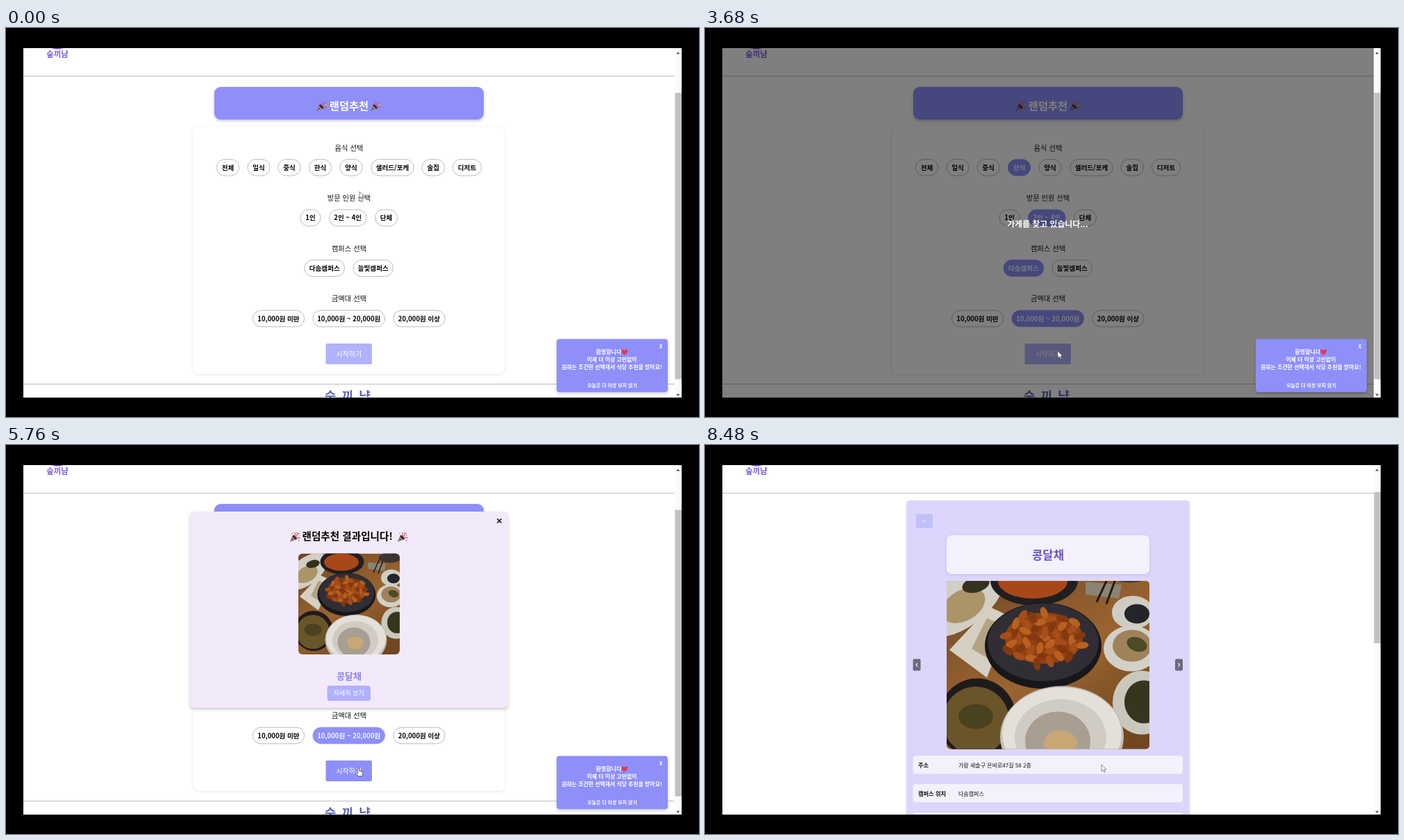
Write an HTML page that moves like this. It is 998x561 px and loops after 8560 ms.

```html
<!DOCTYPE html>
<html lang="ko">
<head>
<meta charset="utf-8">
<style>
html, body { margin: 0; height: 100%; overflow: hidden; background: #000; }
svg { display: block; width: 100%; height: 100%; }
text { font-family: "Noto Sans CJK KR", "Noto Sans KR", "Noto Sans CJK JP", sans-serif; white-space: pre; }
.soft { filter: drop-shadow(0 1px 2px rgba(0,0,0,.1)); }
.lift { filter: drop-shadow(0 2px 2px rgba(0,0,0,.22)); }
.chip rect { fill: #fff; stroke: #a9a8b4; stroke-width: .8; }
.chip text { fill: #000; }
.chip.on rect { fill: #8e8ff9; stroke: #8e8ff9; }
.chip.on text { fill: #f4f4ff; }
</style>
</head>
<body>
<svg id="stage" viewBox="0 0 998 561"></svg>
<script>
const LOOP = 8560, STEP = 80, SCROLL = 65;
const SEARCH = 3680, FOUND = 5680, DETAIL = 7200;
const MAIN = '#8e8ff9', PALE = '#b1b1fc';
const BRAND = '숲끼냠', SHOP = '콩달채', CAMPUS = ['다솜캠퍼스', '늘빛캠퍼스'];

const rect = (x, y, w, h, r, fill, more = '') =>
  `<rect x="${x}" y="${y}" width="${w}" height="${h}" rx="${r}" fill="${fill}" ${more}/>`;
// y is the middle of the line
const text = (x, y, s, size, weight, fill, anchor = 'middle', more = '') =>
  `<text x="${x}" y="${y + size * .37}" font-size="${size}" font-weight="${weight}" fill="${fill}" text-anchor="${anchor}" ${more}>${s}</text>`;
const oval = (x, y, rx, ry, fill, turn = 0) =>
  `<ellipse rx="${rx}" ry="${ry}" fill="${fill}" transform="translate(${x} ${y}) rotate(${turn})"/>`;
const path = (d, fill, more = '') => `<path d="${d}" fill="${fill}" ${more}/>`;
const group = (id, body, more = '') => `<g id="${id}" ${more}>${body}</g>`;

const popper = (x, y) => `<g transform="translate(${x} ${y})">` +
  path('M0 14.5L4 5.5L9.5 11Z', '#4a4a86') + path('M1.4 11.4L3.8 13M2.8 8.2L6.8 12', 'none', 'stroke="#f0b548" stroke-width="1.2"') +
  oval(6.8, 8.2, 1.8, 3.8, '#2d2c54', -45) +
  path('M6.5 6.5Q8.5 4 6.5 1M8.5 8Q10 3 13 2.5M9.5 9.5Q12 7.5 14.5 9.5', 'none', 'stroke="#e0604a" stroke-width="1.3"') +
  oval(10, 1.5, .9, .9, '#58a6e8') + oval(13.5, 5.8, .9, .9, '#f0b548') +
  oval(3.2, 2.6, .9, .9, '#58a6e8') + oval(12.5, 12.5, .9, .9, '#6b8fe0') + '</g>';

// Table of dishes in a 292 x 291 square
function dishes() {
  let s = rect(0, 0, 292, 291, 0, 'url(#wood)');
  s += oval(22, 52, 72, 38, '#d2cec4', -38) + oval(24, 60, 34, 22, '#ab9468', -30) + oval(42, 30, 20, 11, '#34311f', -15);
  s += path('M62 62L92 76L58 164L4 124Z', '#d5d0c3') + path('M58 78L84 90L62 138L36 122Z', '#b3a384');
  s += oval(126, 24, 63, 36, '#211e22') + oval(124, 25, 50, 25, '#a84818');
  s += path('M200 26L252 30L248 50L200 44Z', '#898473') + path('M216 55L236 12M230 58L246 14', 'none', 'stroke="#211a17" stroke-width="3"');
  s += oval(264, 12, 32, 15, '#3b3432');
  s += oval(268, 70, 30, 24, '#cfccc3') + oval(274, 72, 18, 14, '#24242b');
  s += oval(266, 122, 40, 33, '#d2d0c7') + oval(267, 118, 28, 23, '#a0825a') + oval(274, 116, 15, 10, '#4d4a26', 20);
  s += oval(281, 200, 42, 46, '#cac8be') + oval(284, 199, 28, 31, '#36361f');
  s += oval(139, 118, 84, 62, '#17161a') + oval(139, 113, 80, 56, '#302e34');
  s += oval(140, 107, 56, 37, '#914114');
  for (let i = 0; i < 44; i++) {
    const a = i * 2.4, r = Math.sqrt(i / 44);
    s += oval(140 + 59 * r * Math.cos(a), 107 + 40 * r * Math.sin(a), 9, 5, ['#b9601f', '#83380f', '#a64d18'][i % 3], i * 47);
  }
  s += oval(44, 223, 56, 58, '#1e1b1d') + oval(42, 226, 48, 49, '#6a5429') + oval(42, 220, 25, 18, '#4a421e');
  s += oval(166, 249, 89, 73, '#c3bdb4') + oval(166, 245, 86, 67, '#e4e0d9') + oval(164, 250, 66, 55, '#d0cbc3');
  s += oval(160, 256, 47, 43, '#a89e91') + oval(164, 258, 24, 18, '#c9a775');
  return s;
}

const rows = [
  ['음식 선택', ['전체', 303, 33], ['일식', 347.5, 33], ['중식', 391.5, 33], ['한식', 436, 33, 1040], ['양식', 480.5, 33],
    ['샐러드/포케', 525.5, 62], ['술집', 598.5, 33.5], ['디저트', 643, 42]],
  ['방문 인원 선택', ['1인', 423.5, 30], ['2인 ~ 4인', 465, 54.5, 1680], ['단체', 531, 33]],
  ['캠퍼스 선택', [CAMPUS[0], 429.5, 58.5, 2320], [CAMPUS[1], 499.5, 58.5]],
  ['금액대 선택', ['10,000원 미만', 355, 75], ['10,000원 ~ 20,000원', 441.5, 104.5, 2880], ['20,000원 이상', 557.5, 75]]
];
const hits = [[460.5, 455, 66.5, 30]];

function chips() {
  return rows.map(([title, ...list], i) => {
    const y = 201.2 + 72.6 * i;
    return text(494, y - 28.5, title, 10.3, 500, '#111') + list.map(([label, x, w, on = LOOP]) => {
      hits.push([x, y - 12, w, 24]);
      return `<g class="chip" data-on="${on}">${rect(x + .4, y - 11.8, w - .8, 23.6, 11.8, '#fff')}${text(x + w / 2, y, label, 9.55, 700, '')}</g>`;
    }).join('');
  }).join('');
}

const header = rect(25, 29, 938, 105, 0, '#fff') + rect(25, 134, 938, 1, 0, '#bdbdc2') +
  oval(74, 76, 19.8, 19.8, '#8257e6') + text(74, 103, BRAND, 11.5, 900, '#7d5bdc') +
  text(697, 42, '더 많은 기능을 이용하려면 로그인이 필요합니다.', 9.45, 500, '#8379d3', 'start') +
  text(889, 42, '로그인/회원가입', 9.4, 500, '#6a50c0', 'start', 'text-decoration="underline"') +
  [['소개', 611], ['고객센터', 660], ['커뮤니티', 732], ['최신리뷰', 805], ['비교함', 878], ['My', 938]]
    .map(([s, x]) => text(x, 83, s, 13.2, 700, '#8a80da', 'start')).join('');

const home = rect(300, 85, 388, 47, 9, MAIN, 'class="lift"') + popper(447.5, 105) + popper(525, 105) +
  text(494, 112, '랜덤추천', 15.3, 700, '#fff') +
  rect(269, 142, 449.5, 357, 9, '#fff', 'class="soft"') + chips() +
  rect(460.5, 455, 66.5, 30, 2, PALE, 'id="start"') + text(493.8, 470, '시작하기', 10.1, 400, '#fff') +
  rect(25, 513, 938, 1, 0, '#bdbdc2') +
  [...BRAND].map((c, i) => text(467 + 24.8 * i, 531.5, c, 18, 900, '#5f62bd')).join('');

const dim = rect(25, 29, 938, 504, 0, '#000', 'opacity=".5"') +
  text(493.5, 283, '가게를 찾고 있습니다...', 11.9, 700, '#fff');

const modal = rect(265, 96, 458, 283, 6, '#f2e9fa', 'class="lift"') +
  path('M707.4 106.4l6 6m0-6l-6 6', 'none', 'stroke="#222" stroke-width="1.7"') +
  popper(409, 125) + popper(564, 125) + text(491.7, 132, '랜덤추천 결과입니다!', 14.6, 700, '#000') +
  `<svg x="421" y="156.5" width="146" height="145.5" viewBox="0 0 292 291"><g clip-path="url(#small)">${dishes()}</g></svg>` +
  text(494, 333, SHOP, 13, 700, '#8c84e4') +
  rect(462.5, 347, 62.5, 22, 4, PALE, 'id="more"') + text(493.8, 358, '자세히 보기', 9.05, 400, '#fff');

const popup = rect(793, 448.5, 160, 76.5, 4, MAIN, 'class="lift"') + text(943, 459, 'X', 7.5, 700, '#fff') +
  text(849.5, 467, '환영합니다', 8, 700, '#fff', 'start') +
  path('M890.8 471.5C885 467.5 885.6 463.6 888.2 463.6Q890 463.6 890.8 465.2Q891.6 463.6 893.4 463.6C896 463.6 896.6 467.5 890.8 471.5Z', '#e8364a') +
  text(872.5, 478, '이제 더 이상 고민없이', 7.9, 700, '#fff') +
  text(872.5, 489, '원하는 조건만 선택해서 식당 추천을 받아요!', 7.9, 700, '#fff') +
  text(873, 515, '오늘은 더 이상 보지 않기', 6.95, 700, '#fff');

const arrowButton = (x, d) => rect(x, 373.5, 11, 17, 2, '#6d6a7e') +
  path(`M${x + 5.5 - d} 379.6l${2 * d} 2.5l${-2 * d} 2.5`, 'none', 'stroke="#fff" stroke-width="1.1"');
const info = (y, label, value) => rect(299.5, y, 388.5, 26.3, 4, '#f3f1fc') +
  text(307, y + 13.7, label, 8.2, 700, '#111', 'start') + text(365, y + 13.7, value, 8, 500, '#111', 'start');

const detail = rect(290, 145, 408, 600, 5, '#dcd6fd', 'class="soft"') +
  rect(304, 164.5, 24, 20.5, 2, '#c0bff8') + text(316, 175, '&lt;', 8, 400, '#fff') +
  rect(348, 195, 292, 56, 7, '#f3f1fc', 'class="soft"') + text(494, 223.5, SHOP, 16.6, 700, '#6b50c0') +
  `<svg x="348" y="261" width="292" height="242.5" viewBox="0 24.5 292 242.5"><g clip-path="url(#large)">${dishes()}</g></svg>` +
  arrowButton(299.5, -1) + arrowButton(677, 1) +
  info(513, '주소', '가람 새솔구 은비로47길 58 2층') + info(554, '캠퍼스 위치', CAMPUS[0]) + info(595, '전화번호', '-');

const bar = rect(963, 29, 10, 504, 0, '#fbfbfb') + rect(963.5, 93.5, 9.5, 413, 0, '#c1c1c1', 'id="thumb"') +
  path('M965.3 37.5h5l-2.5 -3z', '#505050', 'id="up"') + path('M965.3 527.7h5l-2.5 3z', '#505050');

const cursor = path('M0 0V9.6L2.2 7.6L3.8 11L5.4 10.3L3.9 7H6.9Z', '#fff', 'id="arrow" stroke="#555" stroke-width=".7"') +
  path('M-1.2 .8Q0 -.8 1.2 .8V4.2L5 5.2Q6.2 5.6 6 7L5 11.6H-.6L-3.8 7.6Q-3.4 5.8 -1.2 7.4Z', '#fff', 'id="hand" stroke="#444" stroke-width=".8"');

const clip = (id, shape) => `<clipPath id="${id}">${shape}</clipPath>`;
document.getElementById('stage').innerHTML =
  '<defs><linearGradient id="wood" x2=".6" y2="1"><stop stop-color="#6d4525"/><stop offset=".6" stop-color="#9a6431"/><stop offset="1" stop-color="#71471f"/></linearGradient>' +
  clip('view', rect(25, 29, 948, 504, 0, '#000')) + clip('small', rect(0, 0, 292, 291, 12, '#000')) +
  clip('large', rect(0, 24.5, 292, 242.5, 5, '#000')) + '</defs>' +
  '<g clip-path="url(#view)">' + rect(25, 29, 948, 504, 0, '#fff') +
  group('top', header) + group('home', home) + group('dim', dim) + group('modal', modal) +
  group('popup', popup) + group('detail', detail) + bar + group('cursor', cursor) + '</g>';

const $ = id => document.getElementById(id);
const show = (id, on) => $(id).style.display = on ? '' : 'none';
const move = (id, x, y) => $(id).setAttribute('transform', `translate(${x} ${y})`);
const ease = p => (p = Math.max(0, Math.min(1, p)), p * p * (3 - 2 * p));

const moves = [[0, 509, 236], [320, 509, 236], [880, 455, 197], [1120, 455, 197], [1520, 494, 268], [1720, 494, 268],
  [2100, 458, 338], [2400, 458, 338], [2800, 490, 412], [2960, 490, 412], [3360, 508, 466], [5920, 508, 466],
  [6560, 493, 358], [7760, 493, 358], [8160, 571, 461], [LOOP, 571, 461]];

function pointer(t) {
  const i = moves.findIndex(m => m[0] > t);
  const [t0, x0, y0] = moves[i - 1], [t1, x1, y1] = moves[i];
  const p = ease((t - t0) / (t1 - t0));
  return [x0 + (x1 - x0) * p, y0 + (y1 - y0) * p];
}
const inside = ([x, y], [l, t, w, h]) => x >= l && x <= l + w && y >= t && y <= t + h;

function draw(t) {
  const onDetail = t >= DETAIL, searching = t >= SEARCH && t < FOUND, found = t >= FOUND && !onDetail;
  const scroll = onDetail ? SCROLL * ease((t - 8000) / 320) : SCROLL;
  const at = pointer(t);
  const overMore = found && inside(at, [462.5, 347, 62.5, 22]);
  const hand = !onDetail && !searching && (overMore || hits.some(h => inside(at, h)));

  show('home', !onDetail);
  show('popup', !onDetail);
  show('dim', searching);
  show('modal', found);
  show('detail', onDetail);
  move('top', 0, -scroll);
  move('detail', 0, -scroll);
  document.querySelectorAll('.chip').forEach(c => c.classList.toggle('on', t >= +c.dataset.on));
  $('start').setAttribute('fill', t >= 2880 && !searching ? MAIN : PALE);
  $('more').setAttribute('fill', overMore ? MAIN : PALE);
  $('thumb').setAttribute('y', onDetail ? 40 + scroll * .43 : 93.5);
  $('thumb').setAttribute('height', onDetail ? 218 : 413);
  $('up').setAttribute('fill', scroll > 0 ? '#505050' : '#a8a8a8');
  move('cursor', ...at);
  show('hand', hand);
  show('arrow', !hand);
}

function tick() {
  const t = performance.now() % LOOP;
  draw(Math.floor(t / STEP) * STEP);
  requestAnimationFrame(tick);
}
tick();
</script>
</body>
</html>
```
